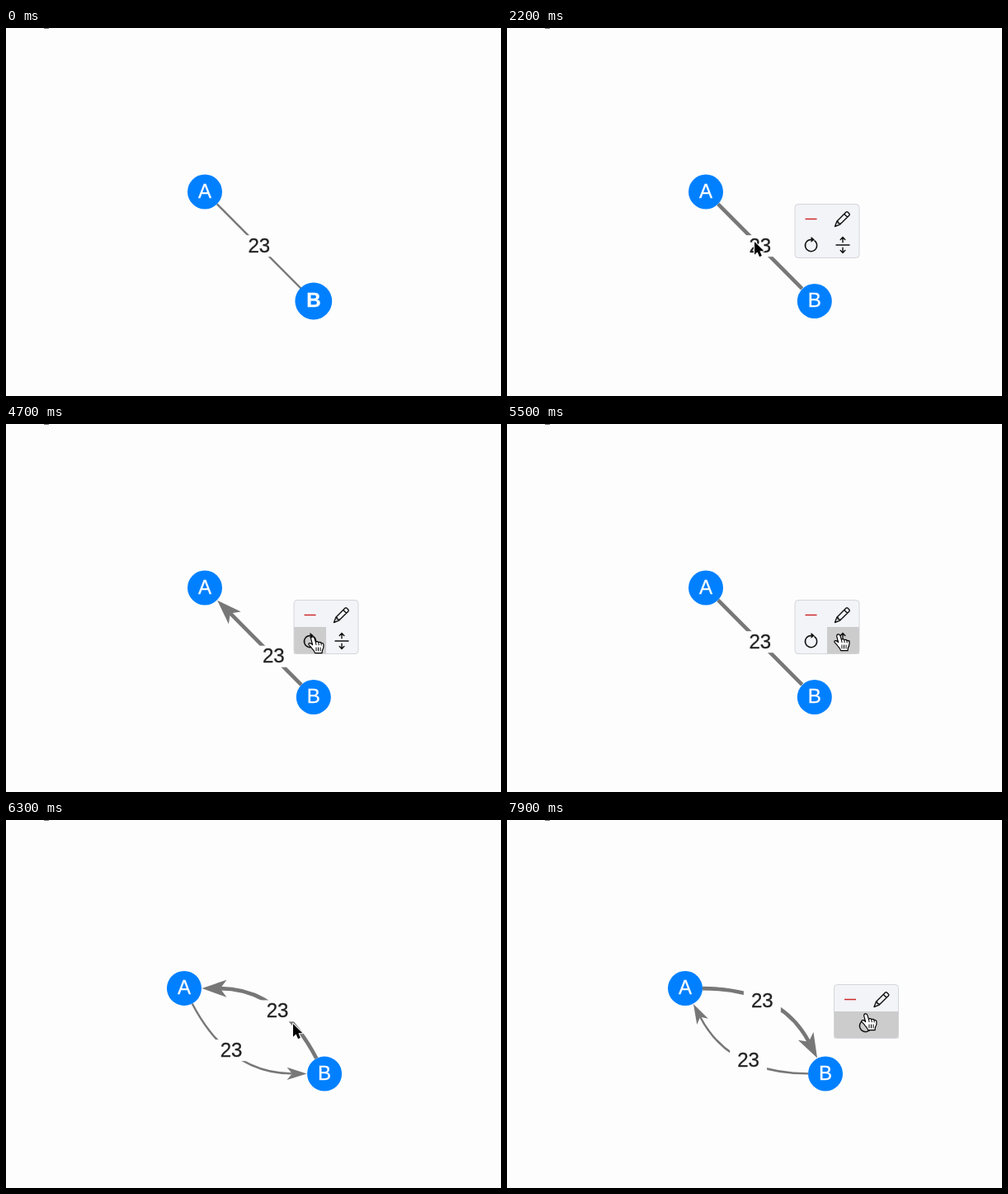
An HTML page that plays this animation: 600x446 px, repeating every 8 s.

```html
<!DOCTYPE html>
<html lang="en">
<head>
<meta charset="utf-8">
<title>Edge editor</title>
<style>
  html, body { margin: 0; width: 100%; height: 100%; overflow: hidden; background: #fdfdfd; }
  svg { display: block; width: 100%; height: 100%; }
  text { font-family: "Liberation Sans", Arial, sans-serif; font-size: 24px; text-anchor: middle; stroke-width: 0.3px; }
</style>
</head>
<body>
<svg viewBox="0 0 600 446">
  <defs>
    <g id="minus"><path d="M-7 0H7" stroke="#cc2a2a" stroke-width="1.5"/></g>
    <g id="pencil" fill="none" stroke="#111" stroke-width="1.4" stroke-linejoin="round">
      <path d="M-9 9L-6.6 2.8L4.6 -8.4Q5.5 -9.2 6.4 -8.4L8.5 -6.3Q9.2 -5.4 8.4 -4.6L-2.8 6.6ZM2.3 -6.1L6.1 -2.3M-6.6 2.8L-5.2 3.2V5.1H-3.2L-2.8 6.6"/>
    </g>
    <g id="turn">
      <path d="M4.4 -5.6A7.1 7.1 0 1 1 0 -7.1" fill="none" stroke="#111" stroke-width="1.5" stroke-linecap="round"/>
      <path d="M0 -10.4V-3.8L4.4 -7.1Z" fill="#111"/>
    </g>
    <g id="split" fill="none" stroke="#111" stroke-width="1.4" stroke-linecap="round" stroke-linejoin="round">
      <path d="M-8 0H8M0 -3.2V-9.3M-2.8 -6.6L0 -9.4L2.8 -6.6M0 3.2V9.3M-2.8 6.6L0 9.4L2.8 6.6"/>
    </g>
    <g id="arrow">
      <path transform="scale(.9)" d="M0 0V17.4L4 13.8L6.7 20.2L9.8 18.9L7.1 12.6H12.6Z" fill="#000" stroke="#fff" stroke-width="2.2" paint-order="stroke" stroke-linejoin="round"/>
    </g>
    <g id="hand" stroke="#000" stroke-width="1.2" stroke-linejoin="round" stroke-linecap="round">
      <path d="M-2.3 2.4C-2.6 -.6 1 -1 1.8 1.4L3.4 6.4C4.6 5.2 6.4 5.6 6.8 6.8C8 5.8 9.6 6.4 10 7.6C11.4 6.9 12.8 7.8 13 9.4C13.3 12 12.8 14 11.4 16.4L11 19.6H2.6C2 17 -.4 15.4 -2 12.8C-3 11.2 -5.4 10.2 -5.2 8.7C-4.9 7 -2.4 7.4 -.4 9.6Z" fill="#fff"/>
      <path d="M3.4 6.4L4 9.6M6.8 6.8L7.2 9.8M10 7.6L10.2 10M4 13V17M6.5 13V17M9 13V17" fill="none" stroke-width="1"/>
    </g>
  </defs>
  <rect x="46" width="6" height="1" fill="#777"/>
  <g id="scene"></g>
</svg>
<script>
const LOOP = 8000, STEP = 100, RADIUS = 21, BEND = 60;
const GREY = '#777', PAPER = '#fdfdfd';
const scene = document.getElementById('scene');

// Clicks, in ms
const ENTER = 1300, SELECT = 2000, OPEN = 2200, DIRECT = 3700, REVERSE = 4300, UNDIRECT = 5300,
  SPLIT = 5600, CLOSE = 5800, REOPEN = 6700, SWAP = 7400;

// Pointer moves: start time, end time and where each one ends
const moves = [
  { from: 1300, to: 1700, at: [300, 259] },
  { from: 2500, to: 3300, at: [402, 255] },
  { from: 4000, to: 4300, at: [372, 258] },
  { from: 4800, to: 5200, at: [402, 255] },
  { from: 5700, to: 6300, at: [348, 247] },
  { from: 6800, to: 7400, at: [425, 250] },
  { from: 7600, to: 7900, at: [435, 235] }
];

const mix = (p, q, f) => p.map((v, i) => v + (q[i] - v) * f);
const fix = p => p.map(v => v.toFixed(2)).join(' ');
const use = (id, x, y) => `<use href="#${id}" x="${x}" y="${y}"/>`;

function pointer(t) {
  return moves.reduce((p, { from, to, at }) => {
    const f = Math.min(1, Math.max(0, (t - from) / (to - from)));
    return mix(p, at, 1 - (1 - f) ** 2);
  }, [441, 182]);
}

// After the split a node is flung outwards and settles at its new rest
function place(t, home, flung, rest) {
  return t < SPLIT ? home : mix(rest, flung, Math.exp((SPLIT - t) / 100));
}

function toward(p, q, d) {
  return mix(p, q, d / Math.hypot(q[0] - p[0], q[1] - p[1]));
}

function label(x, y, text, fill, weight = 400) {
  return `<text x="${x}" y="${y}" fill="${fill}" stroke="${fill}" font-weight="${weight}">${text}</text>`;
}

function node([x, y], name, active) {
  return `<circle cx="${x}" cy="${y}" r="${active ? 22.4 : RADIUS}" fill="#0080ff"/>` +
    label(x, y + 7.2, name, '#fff', active ? 700 : 400);
}

// bend moves the control point to the right of the direction of travel
function edge(from, to, { bend = 0, thick = false, directed = true }) {
  const dx = to[0] - from[0], dy = to[1] - from[1], len = Math.hypot(dx, dy);
  const mid = mix(from, to, 0.5);
  const ctrl = [mid[0] - dy / len * bend, mid[1] + dx / len * bend];
  const start = toward(from, ctrl, RADIUS), tip = toward(to, ctrl, RADIUS + 0.5);
  const size = thick ? 30 : 24, half = thick ? 10.5 : 7.7;
  const notch = toward(tip, ctrl, size * 0.74);
  let out = `<path d="M${fix(start)}Q${fix(ctrl)} ${fix(directed ? notch : tip)}" fill="none" stroke="${GREY}" stroke-width="${thick ? 4.6 : 2.4}"/>`;
  if (directed) {
    const back = toward(tip, ctrl, size);
    const [ux, uy] = [0, 1].map(i => (back[i] - tip[i]) / size * half);
    const left = [back[0] - uy, back[1] + ux], right = [back[0] + uy, back[1] - ux];
    out += `<path d="M${fix(tip)}L${fix(left)}L${fix(notch)}L${fix(right)}Z" fill="${GREY}"/>`;
  }
  const s = !directed ? 0.5 : bend ? 0.43 : 0.33;
  const [x, y] = mix(mix(start, ctrl, s), mix(ctrl, tip, s), s);
  return out + `<rect x="${x - 22.5}" y="${y - 13.5}" width="45" height="26" fill="${PAPER}"/>` +
    label(x, y + 7.2, '23', '#222');
}

function edges(t, a, b) {
  const thick = t >= SELECT;
  if (t >= SPLIT) {
    const swapped = t >= SWAP, bend = swapped ? -BEND : BEND;
    const [p, q] = swapped ? [a, b] : [b, a];
    return edge(q, p, { bend }) + edge(p, q, { bend, thick });
  }
  const directed = t >= DIRECT && t < UNDIRECT;
  return directed && t >= REVERSE ? edge(b, a, { thick }) : edge(a, b, { thick, directed });
}

function menu(x, y, wide, [px, py]) {
  const box = `<rect x="${x}" y="${y}" width="78" height="65" rx="4" `;
  let out = box + 'fill="#f3f4f8"/>';
  if (px > x && px < x + 78 && py > y && py < y + 65) {
    const row = py > y + 32.5, right = px >= x + 36, full = wide && row;
    out += `<rect x="${x + (right && !full ? 39 : 0)}" y="${y + (row ? 32.5 : 0)}" width="${full ? 78 : 39}" height="32.5" fill="#ccc"/>`;
  }
  out += box + 'fill="none" stroke="#d4d5da"/>' +
    use('minus', x + 19.5, y + 18) + use('pencil', x + 57.5, y + 18);
  return out + (wide ? use('turn', x + 38, y + 50)
    : use('turn', x + 19.5, y + 50) + use('split', x + 58, y + 49.5));
}

function draw(t) {
  const a = place(t, [241, 198.5], [173, 133], [216, 204]);
  const b = place(t, [372.8, 331], [463, 419], [386, 307.5]);
  const p = pointer(t);
  const first = t >= OPEN && t < CLOSE, second = t >= REOPEN;
  let out = edges(t, a, b) + node(a, 'A') + node(b, 'B', t < SELECT);
  if (first) out += menu(349, 213.5, false, p);
  if (second) out += menu(396.5, 199.5, true, p);
  if (t >= ENTER) {
    const over = first && p[0] > 349 || second && p[0] > 396.5;
    out += use(over ? 'hand' : 'arrow', p[0].toFixed(1), p[1].toFixed(1));
  }
  scene.innerHTML = out;
}

let shown = -1;
function tick() {
  const t = Math.floor(performance.now() % LOOP / STEP) * STEP;
  if (t !== shown) draw(shown = t);
  requestAnimationFrame(tick);
}
tick();
</script>
</body>
</html>
```
